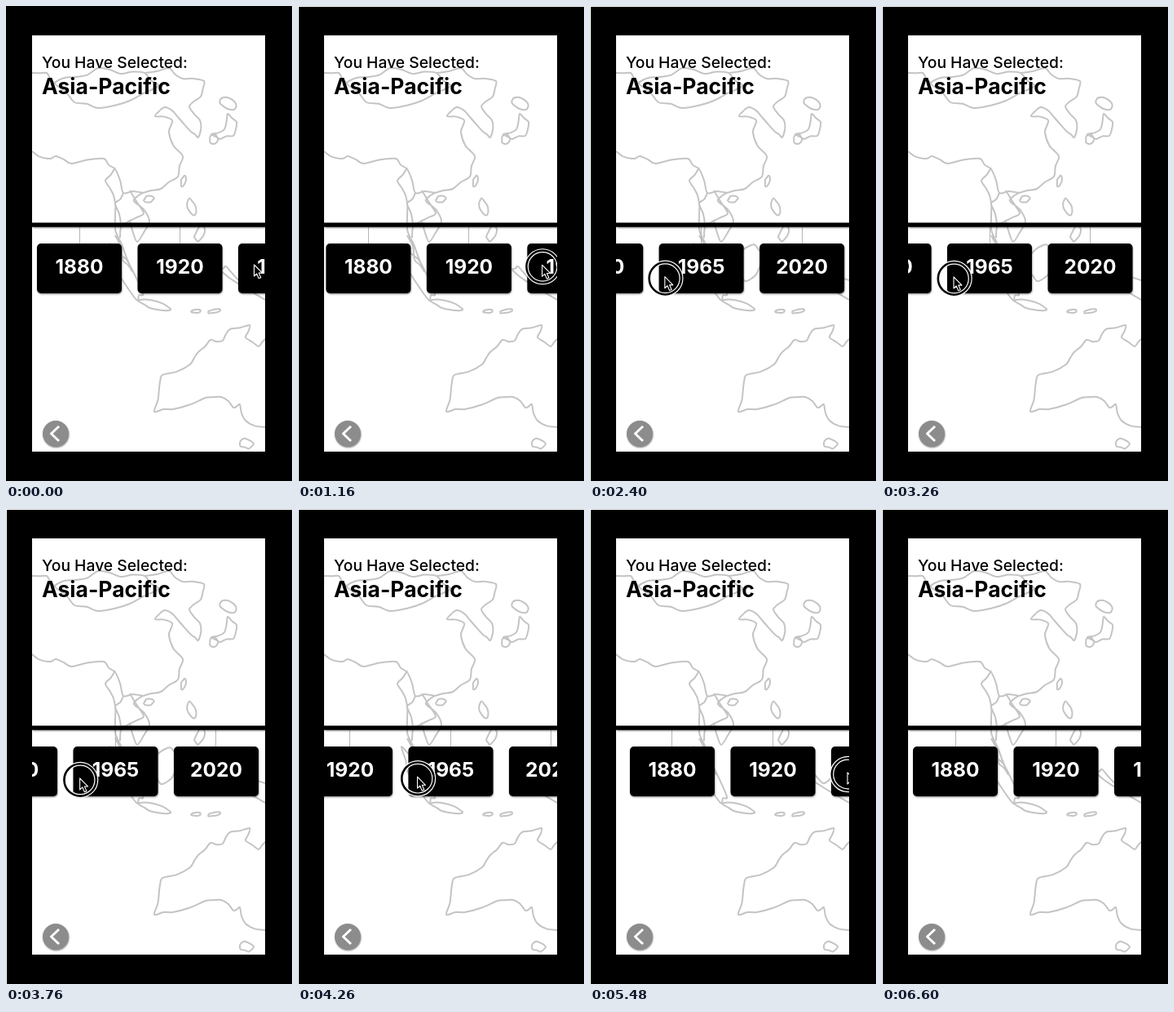
An HTML page with a canvas for the animation above (7720 ms loop, 351 by 582 pixels).

```html
<!DOCTYPE html>
<html lang="en">
<head>
<meta charset="utf-8">
<title>Timeline picker</title>
<style>
  html, body { margin: 0; width: 100%; height: 100%; overflow: hidden; background: #000; }
  canvas { display: block; width: 351px; height: 582px; }
</style>
</head>
<body>
<canvas id="stage" width="351" height="582"></canvas>
<script>
const ctx = document.getElementById('stage').getContext('2d');
const LOOP = 7720, STEP = 20;
const VIEW = { x: 32, y: 36, w: 286, h: 510 };
const CARD = { y: 291, w: 104, h: 61, pitch: 123.5 };
const YEARS = ['1880', '1920', '1965', '2020'];
const FONT = 'Inter, "Open Sans", sans-serif';

let seed = 7;
function random() {
  seed = (seed * 16807) % 2147483647;
  return seed / 2147483647;
}

const map = new Path2D();

// Smooth curve through points
function curve(p, closed) {
  const n = p.length;
  const at = i => closed ? p[(i + n) % n] : p[Math.max(0, Math.min(n - 1, i))];
  map.moveTo(...p[0]);
  for (let i = 0; i < (closed ? n : n - 1); i++) {
    const [a, b, c, d] = [at(i - 1), at(i), at(i + 1), at(i + 2)];
    map.bezierCurveTo(
      b[0] + (c[0] - a[0]) / 7, b[1] + (c[1] - a[1]) / 7,
      c[0] - (d[0] - b[0]) / 7, c[1] - (d[1] - b[1]) / 7, c[0], c[1]);
  }
}

// A few key points, roughened by shifting the middle of each side
function coast(text, closed = false) {
  const keys = text.split(' ').map(s => s.split(',').map(Number));
  const points = [];
  keys.forEach(([x, y], i) => {
    points.push([x, y]);
    if (i === keys.length - 1 && !closed) return;
    const [u, v] = keys[(i + 1) % keys.length];
    const k = (random() - 0.5) * 0.24;
    points.push([(x + u) / 2 - (v - y) * k, (y + v) / 2 + (u - x) * k]);
  });
  curve(points, closed);
}

// Uneven ellipse
function island(x, y, rx, ry, turn = 0) {
  const points = [];
  for (let i = 0; i < 10; i++) {
    const a = i * Math.PI / 5, r = 0.8 + random() * 0.35;
    const px = Math.cos(a) * rx * r, py = Math.sin(a) * ry * r;
    points.push([
      x + px * Math.cos(turn) - py * Math.sin(turn),
      y + px * Math.sin(turn) + py * Math.cos(turn)]);
  }
  curve(points, true);
}

// Northern borders, China and Korea
coast('60,95 85,87 113,76 141,83 170,82 187,98 152,116 113,125 84,118', true);
coast('32,82 50,82 60,95');
coast('170,82 200,76 217,89 243,92 239,111 225,123 238,140 236,161 227,154 211,136 195,124 183,135 204,140 200,155 217,184 211,209 190,224 168,229');
// South Asia, Indochina and the Malay peninsula
coast('32,178 51,187 61,184 80,193 120,187 134,200 144,229 168,229');
coast('134,198 122,214 132,232 134,258 142,292 155,325 143,311 134,281');
coast('144,229 134,242 141,268 140,284');
coast('152,226 169,254 152,263 142,267');
coast('168,229 157,239 176,264 161,289 152,263');
// Japan
island(272, 119, 11, 7, 0.4);
coast('272,132 283,142 279,159 263,163 252,157 268,151', true);
island(255, 163, 5, 6);
// Islands
island(218, 214, 3, 7, 0.3);
island(175, 237, 6, 4, -0.2);
island(227, 246, 5, 11, -0.3);
island(238, 278, 5, 11, 0.4);
island(148, 328, 38, 8, 1.05);
island(184, 367, 21, 5, 0.25);
island(196, 315, 23, 15, -0.9);
island(225, 327, 7, 16, 0.2);
island(233, 374, 6, 2);
island(255, 374, 8, 2, -0.2);
coast('318,336 297,329 286,336 270,319 263,323 283,339 318,360');
// Australia
coast('318,408 310,417 294,406 299,391 275,396 266,410 251,409 236,424 226,439 192,452 188,468 182,497 205,494 245,480 264,479 279,492 287,488 294,508 318,516');
island(295, 536, 8, 6);

const clamp = u => Math.max(0, Math.min(1, u));
function glide(t, from, to) {
  const u = clamp((t - from) / (to - from));
  return u * u * u * (10 - 15 * u + 6 * u * u);
}

function pose(t) {
  const pull = glide(t, 920, 2620), back = glide(t, 3540, 5520);
  return {
    left: 38 - 205 * glide(t, 940, 2640) + 216 * back - 11 * glide(t, 5840, 6380),
    x: 304.5 - 216.5 * pull + 228 * back + 19 * glide(t, 5840, 6240),
    y: 317 + 15 * pull - 2 * glide(t, 3240, 3740) - 7 * back
  };
}

function label(text, x, y, font, color, align = 'left') {
  ctx.font = font + ' ' + FONT;
  ctx.fillStyle = color;
  ctx.textAlign = align;
  ctx.fillText(text, x, y);
}

// Fill a shape with a soft shadow below it
function raised(color, shape) {
  ctx.save();
  ctx.shadowColor = 'rgba(0,0,0,.45)';
  ctx.shadowBlur = 2;
  ctx.shadowOffsetX = 0.5;
  ctx.shadowOffsetY = 1.3;
  ctx.fillStyle = color;
  ctx.beginPath();
  shape();
  ctx.fill();
  ctx.restore();
}

function card(x, year) {
  const mid = x + CARD.w / 2;
  ctx.fillStyle = '#b5b5b5';
  ctx.fillRect(Math.floor(mid), 271, 1, 20);
  raised('#000', () => ctx.roundRect(x, CARD.y, CARD.w, CARD.h, 5));
  label(year, mid, 328, '700 24.5px', '#fff', 'center');
}

function backButton() {
  raised('#8c8c8c', () => ctx.arc(61, 524, 16, 0, Math.PI * 2));
  ctx.strokeStyle = '#fff';
  ctx.lineWidth = 3;
  ctx.beginPath();
  ctx.moveTo(65, 515);
  ctx.lineTo(55.5, 524);
  ctx.lineTo(65, 533);
  ctx.stroke();
}

function ring(x, y) {
  for (const [color, width] of [['#fff', 5], ['#000', 2.6]]) {
    ctx.strokeStyle = color;
    ctx.lineWidth = width;
    ctx.beginPath();
    ctx.arc(x, y, 19.7, 0, Math.PI * 2);
    ctx.stroke();
  }
}

const arrow = new Path2D('M0 0V14L3.2 11L5.7 16.8L8.3 15.7L5.8 10.1H10Z');
function pointer(x, y) {
  ctx.save();
  ctx.translate(x, y);
  ctx.fillStyle = '#000';
  ctx.fill(arrow);
  ctx.strokeStyle = '#fff';
  ctx.lineWidth = 1.1;
  ctx.stroke(arrow);
  ctx.restore();
}

function draw(t) {
  ctx.fillStyle = '#000';
  ctx.fillRect(0, 0, 351, 582);
  if (t >= 20) {
    ctx.fillStyle = '#fff';
    ctx.fillRect(0, 0, 351, 1);
    ctx.fillRect(0, 0, 1, 582);
  }

  ctx.save();
  ctx.beginPath();
  ctx.rect(VIEW.x, VIEW.y, VIEW.w, VIEW.h);
  ctx.clip();
  ctx.fillStyle = '#fff';
  ctx.fillRect(VIEW.x, VIEW.y, VIEW.w, VIEW.h);
  ctx.strokeStyle = '#c4c4c4';
  ctx.lineWidth = 2;
  ctx.lineJoin = 'round';
  ctx.stroke(map);

  label('You Have Selected:', 44, 76, '500 19.3px', '#000');
  label('Asia-Pacific', 44, 108, '700 26.5px', '#000');

  const { left, x, y } = pose(t);
  YEARS.forEach((year, i) => card(left + i * CARD.pitch, year));
  raised('#000', () => ctx.rect(VIEW.x, 265.6, VIEW.w, 5.2));
  backButton();

  if (t < 6600) {
    if (t >= 660) ring(x + 0.5, y + 2);
    pointer(x, y);
  }
  ctx.restore();
}

const start = performance.now();
function tick() {
  const t = (performance.now() - start) % LOOP;
  draw(Math.floor(t / STEP) * STEP);
  requestAnimationFrame(tick);
}
tick();
</script>
</body>
</html>
```
